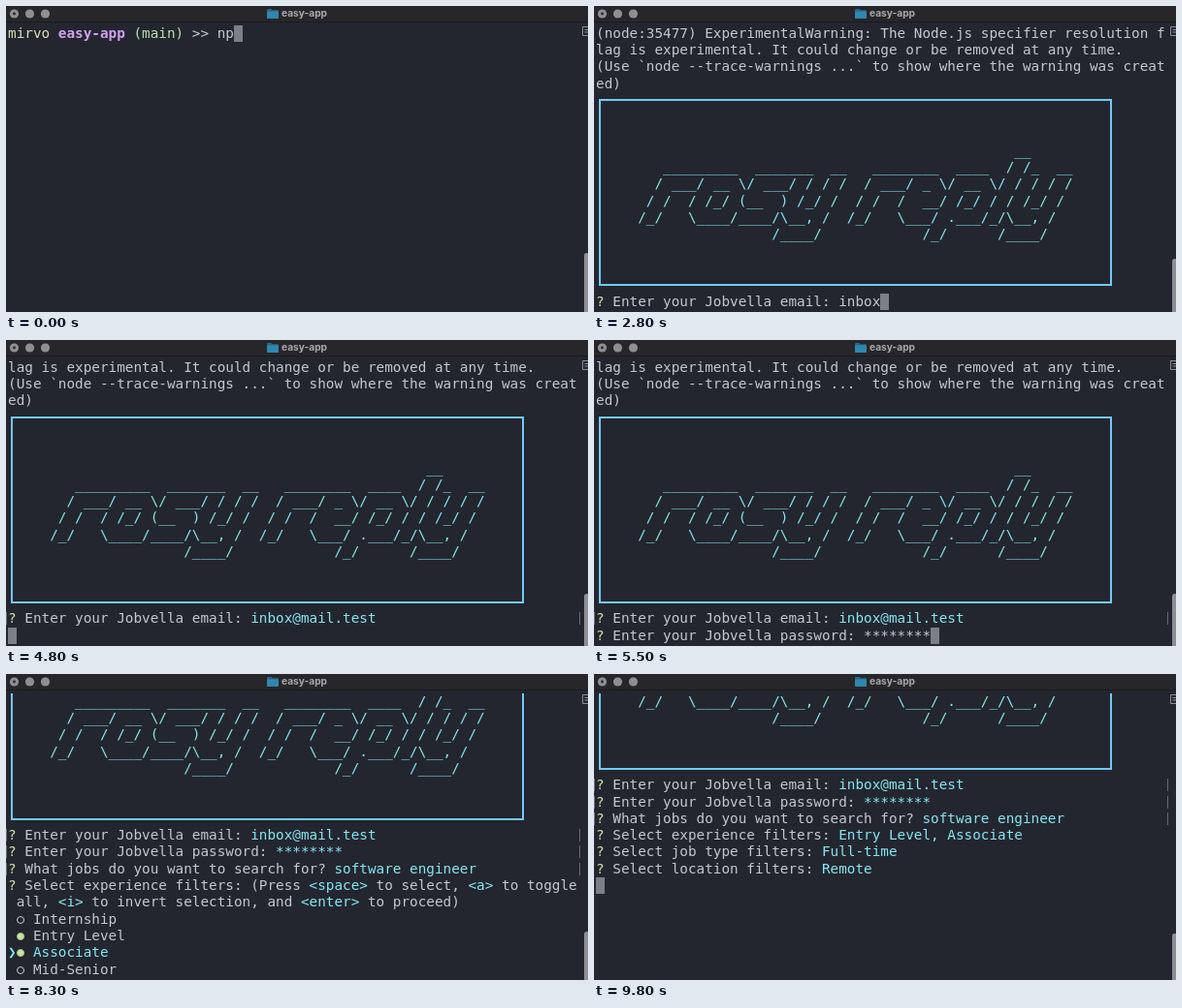
An HTML page that plays this animation: 600 by 316 pixels, repeating every 9900 ms.

```html
<!DOCTYPE html>
<html lang="en">
<head>
<meta charset="utf-8">
<title>easy-app</title>
<style>
  html, body { margin: 0; width: 100%; height: 100%; overflow: hidden; background: #23262f; }
  #stage { position: relative; width: 600px; height: 316px; overflow: hidden; background: #23262f; }
  #bar { position: absolute; inset: 0 0 auto; height: 16px; background: #272629; border-bottom: 1px solid #1b1c21; }
  #bar svg { position: absolute; left: 0; top: 0; }
  #bar b { position: absolute; left: 284px; top: 0; font: 700 10.2px/15px Inter, "Open Sans", sans-serif; color: #a9a9ab; }
  #view { position: absolute; left: 0; top: 19.8px; width: 600px; height: 297px; overflow: hidden; }
  #term { position: absolute; left: 2px; top: 0; color: #c4c7cd;
          font: 14.33px/17.3px "DejaVu Sans Mono", Menlo, monospace; font-variant-ligatures: none; }
  .row { position: relative; height: 17.3px; width: 598px; white-space: pre; }
  .user { color: #dde0b2; }
  .dir { color: #d2a0f2; font-weight: 700; }
  .git { color: #b9dfab; }
  .ask { color: #c8e6a2; }
  .cyan { color: #84e6f2; }
  .cur { display: inline-block; height: 17.3px; vertical-align: top; background: #7b7f86; }
  .frame { position: absolute; box-sizing: border-box; left: 3px; top: 7.4px; width: 528.7px; height: 192.8px;
           border: 2.5px solid #74c9f7; }
  .mark { position: absolute; box-sizing: border-box; left: -2px; top: 2px; width: 592px; height: 13px;
          border: solid #666a72; border-width: 0 1px; }
  .off, .on { position: relative; color: transparent; }
  .off::after, .on::after { content: ""; position: absolute; box-sizing: border-box; left: .3px; top: 5px;
          width: 8px; height: 8px; border-radius: 50%; border: 1.2px solid #c9ccd2; }
  .on::after { background: #c8e6a2; border-color: #a9c28c; }
  #thumb { position: absolute; left: 596px; width: 5px; height: 70px; border-radius: 3px; background: #8d8e91; }
  #split { position: absolute; left: 594px; top: 21px; }
</style>
</head>
<body>
<div id="stage">
  <div id="view"><div id="term"></div></div>
  <div id="bar">
    <svg width="290" height="16">
      <g fill="#8f8f92"><circle cx="8.5" cy="8" r="4.6"/><circle cx="24.5" cy="8" r="4.6"/><circle cx="40.5" cy="8" r="4.6"/></g>
      <circle cx="8.5" cy="8" r="1.4" fill="#272629"/>
      <path d="M269 4q0-1 1-1h3.5l1.2 1.3h5.3q1 0 1 1v6.7q0 1-1 1h-10q-1 0-1-1z" fill="#24698a"/>
      <rect x="269" y="5.6" width="12" height="7.4" rx="1" fill="#2f87b0"/>
    </svg>
    <b>easy-app</b>
  </div>
  <svg id="split" width="6" height="10" fill="none" stroke="#8a8c91"><path d="M6 .5H.5v9H6M2.5 3.5H6M2.5 6H6"/></svg>
  <div id="thumb"></div>
</div>
<script>
(() => {
const COLS = 68, ROWS = 17, LINE = 17.3, STEP = 100, STEPS = 99;
const CUR = [' ', 'cur'], MARK = [' ', 'mark'];

const LOGO = String.raw`
                                             __
   _________  _______  __   ________  ____  / /_  __
  / ___/ __ \/ ___/ / / /  / ___/ _ \/ __ \/ / / / /
 / /  / /_/ (__  ) /_/ /  / /  /  __/ /_/ / / /_/ /
/_/   \____/____/\__, /  /_/   \___/ .___/_/\__, /
                /____/            /_/      /____/
`.split('\n').slice(1, -1);

const HINT = [['(Press '], ['<space>', 'cyan'], [' to select, '], ['<a>', 'cyan'], [' to toggle all, '],
  ['<i>', 'cyan'], [' to invert selection, and '], ['<enter>', 'cyan'], [' to proceed)']];

// Times are in steps of 100 ms; keys are [step, typed length] points.
const QUESTIONS = [
  { label: 'Enter your Jobvella email:', at: 21, end: 40, answer: 'inbox@mail.test',
    keys: [[23, 0], [28, 5], [29, 5], [31, 12], [32, 12], [35, 15]] },
  { label: 'Enter your Jobvella password:', at: 49, end: 56, answer: '********',
    keys: [[49, 0], [55, 8]] },
  { label: 'What jobs do you want to search for?', at: 57, end: 70, answer: 'software engineer',
    typo: 'software enginer', fixed: 67, keys: [[58, 0], [66, 16], [67, 15], [68, 17]] },
  { label: 'Select experience filters:', at: 71, end: 85, answer: 'Entry Level, Associate',
    list: ['Internship', 'Entry Level', 'Associate', 'Mid-Senior'],
    moves: [74, 79], picks: [[76, 1], [81, 2]] },
  { label: 'Select job type filters:', at: 86, end: 90, answer: 'Full-time',
    list: ['Full-time', 'Part-time', 'Contract', 'Temporary', 'Volunteer', 'Internship'],
    moves: [], picks: [[88, 0]] },
  { label: 'Select location filters:', at: 91, end: 97, answer: 'Remote',
    list: ['On-site', 'Remote', 'Hybrid'],
    moves: [93], picks: [[95, 1]] },
];

function typedLength(keys, t) {
  if (t <= keys[0][0]) return keys[0][1];
  for (let i = 1; i < keys.length; i++) {
    const [a, m] = keys[i - 1], [b, n] = keys[i];
    if (t <= b) return Math.floor(m + (n - m) * (t - a) / (b - a));
  }
  return keys[keys.length - 1][1];
}

function choices(q, t) {
  const at = q.moves.filter(m => t >= m).length;
  return q.list.map((name, i) => {
    const on = q.picks.some(([when, n]) => n === i && t >= when);
    return [[i === at ? '❯' : ' ', 'cyan'], ['o', on ? 'on' : 'off'], [' ' + name, i === at ? 'cyan' : '']];
  });
}

function linesAt(t) {
  const shell = [['mirvo', 'user'], [' '], ['easy-app', 'dir'], [' '], ['(main)', 'git'],
    [' >> ' + 'npm start'.slice(0, 2 + t)]];
  if (t < 9) return [[...shell, CUR]];
  const out = [[MARK, ...shell]];
  const print = (...texts) => texts.forEach(s => out.push([[s]]));
  const idle = () => [...out, [CUR]];

  if (t < 10) return idle();
  print('', '> easy-app@1.0.0 start',
    '> npm run build && node --experimental-specifier-resolution=node build/index.js', '');
  if (t < 13) return idle();
  print('', '> easy-app@1.0.0 build', '> npx tsc --build', '');
  if (t < 18) return idle();
  print('(node:35477) ExperimentalWarning: The Node.js specifier resolution flag is experimental. ' +
    'It could change or be removed at any time.',
    '(Use `node --trace-warnings ...` to show where the warning was created)');
  if (t < 20) return idle();
  out.push([[' ', 'frame']]);
  print('', '');
  LOGO.forEach(s => out.push([['     ' + s, 'cyan']]));
  print('', '', '');

  for (const q of QUESTIONS) {
    if (t < q.at) return idle();
    const head = [['?', 'ask'], [' ' + q.label + ' ']];
    if (t < q.end) {
      if (q.list) return [...out, [...head, ...HINT], ...choices(q, t)];
      const text = t < q.fixed ? q.typo : q.answer;
      return [...out, [...head, [text.slice(0, typedLength(q.keys, t))], CUR]];
    }
    const line = [...head, [q.answer, 'cyan']];
    out.push(q.list ? line : [MARK, ...line]);
  }
  return idle();
}

function wrap(line) {
  const rows = [[]];
  let used = 0;
  for (let [text, cls] of line) {
    if (cls === 'mark') { rows[0].push([text, cls]); continue; }
    while (text) {
      if (used === COLS) { rows.push([]); used = 0; }
      const part = text.slice(0, COLS - used);
      rows[rows.length - 1].push([part, cls]);
      used += part.length;
      text = text.slice(part.length);
    }
  }
  return rows;
}

// The view only ever scrolls down, so keep the furthest position reached.
let scrolled = 0;
const shots = Array.from({ length: STEPS }, (_, t) => {
  const rows = linesAt(t).flatMap(wrap);
  scrolled = Math.max(scrolled, rows.length - ROWS);
  return { rows, scroll: scrolled };
});

const term = document.getElementById('term'), thumb = document.getElementById('thumb');

function el(tag, cls) {
  const node = document.createElement(tag);
  if (cls) node.className = cls;
  return node;
}

function draw({ rows, scroll }) {
  term.replaceChildren(...rows.map(segs => {
    const row = el('div', 'row');
    for (const [text, cls] of segs) {
      const span = el('span', cls);
      span.textContent = text;
      row.append(span);
    }
    return row;
  }));
  term.style.top = -scroll * LINE + 'px';
  thumb.style.top = 255 + scroll * 0.6 + 'px';
}

const start = performance.now();
let shown = -1;
function tick() {
  const step = Math.floor((performance.now() - start) / STEP) % STEPS;
  if (step !== shown) draw(shots[shown = step]);
  requestAnimationFrame(tick);
}
tick();
})();
</script>
</body>
</html>
```
